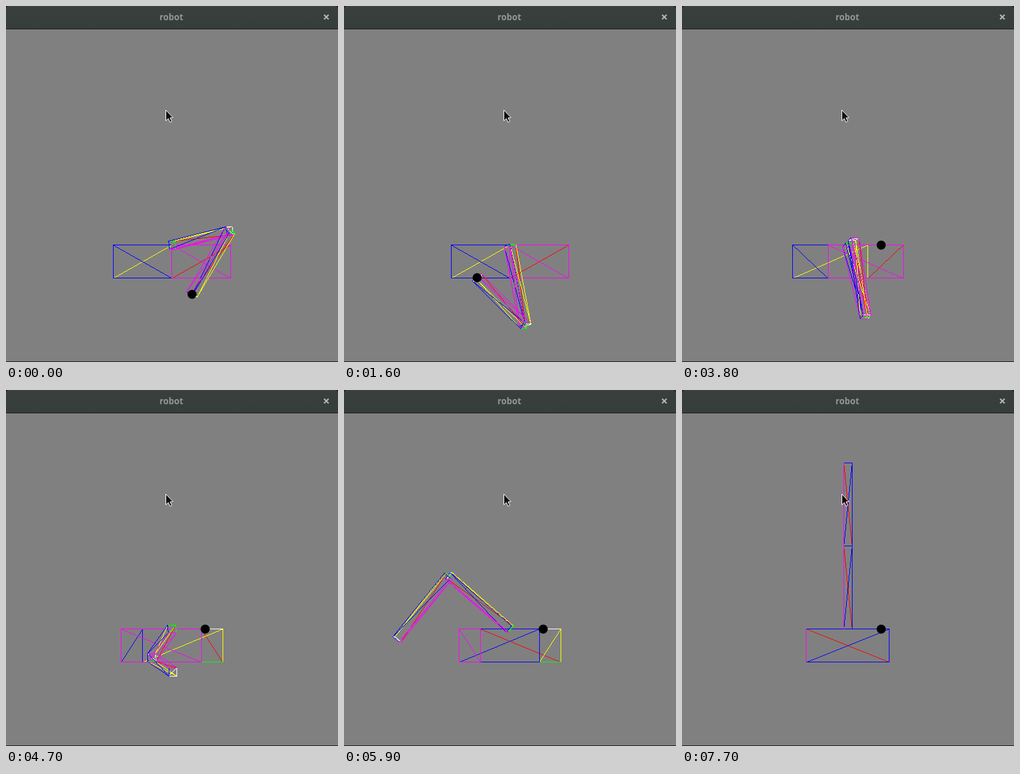
An HTML page with a canvas that plays this animation: 512x549 px, repeating every 8 s.

```html
<!DOCTYPE html>
<html lang="en">
<head>
<meta charset="utf-8">
<title>robot</title>
<style>
  html, body { margin: 0; width: 100%; height: 100%; overflow: hidden; background: #000; }
  .window { position: relative; width: 512px; height: 549px; overflow: hidden; background: #1c1c1e; }
  .bar {
    position: absolute; inset: 0 0 auto; height: 35px; box-sizing: border-box;
    padding-right: 2px;
    border-radius: 5px 5px 0 0; border-top: 1px solid #3d4442;
    background: linear-gradient(#383f3d, #363d3a);
    font: bold 13.3px/33px "Open Sans", "Noto Sans", sans-serif;
    color: #929795; text-align: center;
  }
  canvas { position: absolute; left: 0; top: 36px; }
  svg { position: absolute; left: 0; top: 0; }
</style>
</head>
<body>
<div class="window">
  <div class="bar">robot</div>
  <canvas id="view" width="512" height="512"></canvas>
  <svg width="512" height="549">
    <path d="M490.5 13.5l7 7m0-7l-7 7" stroke="#b4b9b7" stroke-width="2" fill="none"/>
    <path d="M246.5 160.5v16.5l3.8-3.4 2.6 5.6 2.8-1.3-2.6-5.4 4.4-.5z" fill="#111" stroke="#fff"/>
  </svg>
</div>
<script>
const ctx = document.getElementById('view').getContext('2d');
const UNIT = 25.6, CENTER = 256, ARM = 5;
const DROP = { base: 135, lower: 170, upper: 210 };
const PLACE = [CENTER + 2 * UNIT, CENTER + 3 * UNIT];

// Unit box corners and its faces in drawing order
const CORNERS = [[-1, 0, 1], [-1, 1, 1], [1, 1, 1], [1, 0, 1],
                 [-1, 0, -1], [-1, 1, -1], [1, 1, -1], [1, 0, -1]];
const FACES = [
  ['#f00', 1, 0, 3, 2], ['#ff0', 2, 3, 7, 6], ['#0f0', 3, 0, 4, 7],
  ['#fff', 6, 5, 1, 2], ['#00f', 4, 5, 6, 7], ['#f0f', 5, 4, 0, 1]
];

const rad = deg => deg * Math.PI / 180;
const clamp = (v, lo, hi) => Math.min(hi, Math.max(lo, v));
const pixel = v => Math.floor(v - 0.01);

// Joint angles in degrees; every tick turns a joint by 5
function pose(tick) {
  if (tick < 34) {
    return {
      base: DROP.base,
      lower: Math.min(DROP.lower, 80 + 5 * (tick + (tick >= 8))),
      upper: clamp(140 + 5 * (tick - 19), 140, DROP.upper),
      held: true
    };
  }
  const step = tick - (tick < 43 ? 1 : 2);
  const back = (end, from) => clamp(5 * (end - step), 0, from);
  return {
    base: back(60, DROP.base),
    lower: back(67, DROP.lower),
    upper: back(75, DROP.upper),
    held: false
  };
}

// Hard-edged line, one pixel wide, sampled at pixel centres of its longer axis
function line(p, q) {
  const main = Math.abs(q[0] - p[0]) >= Math.abs(q[1] - p[1]) ? 0 : 1;
  const side = 1 - main;
  const [a, b] = p[main] <= q[main] ? [p, q] : [q, p];
  const length = b[main] - a[main] || 1;
  const dot = [0, 0];
  for (let i = pixel(a[main]); i <= pixel(b[main]); i++) {
    const t = clamp((i + 0.5 - a[main]) / length, 0, 1);
    dot[main] = i;
    dot[side] = pixel(a[side] + t * (b[side] - a[side]));
    ctx.fillRect(dot[0], dot[1], 1, 1);
  }
}

function project(u, v, z, turn) {
  return [CENTER + UNIT * (u * Math.cos(turn) + z * Math.sin(turn)), CENTER - UNIT * v];
}

// Draws a box standing on (u, v), tilted in the arm plane; returns its far end
function box(u, v, width, height, tilt, turn) {
  const c = Math.cos(tilt), s = Math.sin(tilt), half = width / 2;
  const pts = CORNERS.map(([x, y, z]) => {
    const px = x * half, py = y * height;
    return project(u + px * c - py * s, v + px * s + py * c, z * half, turn);
  });
  for (const [color, a, b, d, e] of FACES) {
    ctx.fillStyle = color;
    for (const [p, q] of [[a, b], [b, d], [d, a], [d, e], [e, a]]) line(pts[p], pts[q]);
  }
  return [u - height * s, v + height * c];
}

function draw(tick) {
  const { base, lower, upper, held } = pose(tick);
  const turn = rad(base);
  ctx.fillStyle = '#808080';
  ctx.fillRect(0, 0, 512, 512);

  let end = box(0, -5, 5, 2, 0, turn);
  end = box(...end, 0.5, ARM, rad(lower), turn);
  end = box(...end, 0.5, ARM, rad(lower + upper), turn);

  const [x, y] = held ? project(...end, 0, turn) : PLACE;
  ctx.fillStyle = '#000';
  ctx.beginPath();
  ctx.arc(x, y, 7, 0, 2 * Math.PI);
  ctx.fill();
}

let shown = -1;
function frame() {
  const tick = Math.floor(performance.now() % 8000 / 100);
  if (tick !== shown) draw(shown = tick);
  requestAnimationFrame(frame);
}
frame();
</script>
</body>
</html>
```
